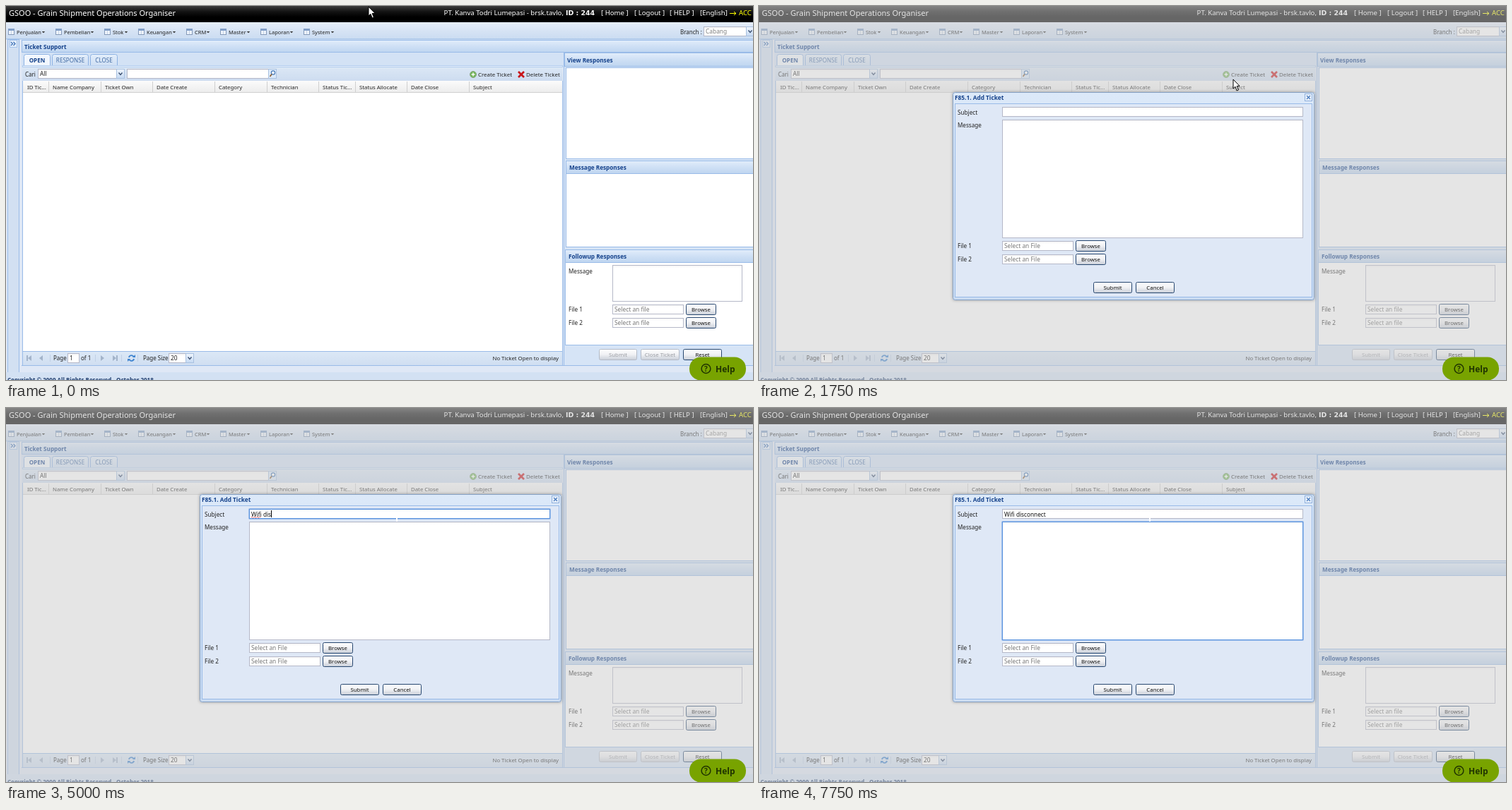
These frames come from a looping animation (1057x530 px, 8 s). An HTML page with a canvas:

```html
<!DOCTYPE html>
<html lang="en">
<head>
<meta charset="utf-8">
<title>Ticket support</title>
<style>
  html, body { margin: 0; width: 100%; height: 100%; overflow: hidden; background: #dfe8f6; }
  canvas { display: block; }
</style>
</head>
<body>
<canvas id="stage" width="1057" height="530"></canvas>
<script>
const ctx = document.getElementById('stage').getContext('2d');
const LOOP = 8000, STEP = 250;
const FONT = '"Noto Sans", "Open Sans", sans-serif';
const BORDER = '#99bbe8', PALE = '#dfe8f6', NAVY = '#15428b', INK = '#222', GREY = '#808080';

// ---- primitives ----
function box(x, y, w, h, fill, stroke) {
  if (fill) { ctx.fillStyle = fill; ctx.fillRect(x, y, w, h); }
  if (stroke) { ctx.strokeStyle = stroke; ctx.lineWidth = 1; ctx.strokeRect(x + .5, y + .5, w - 1, h - 1); }
}
function fade(y, h, ...colors) {
  const g = ctx.createLinearGradient(0, y, 0, y + h);
  colors.forEach((c, i) => g.addColorStop(i / (colors.length - 1), c));
  return g;
}
function text(str, x, y, color = INK, size = 8, weight = 400, align = 'left') {
  ctx.font = `${weight} ${size}px ${FONT}`;
  ctx.textAlign = align;
  ctx.fillStyle = color;
  ctx.fillText(str, x, y);
}
const bold = (str, x, y, color = NAVY, size = 8.2) => text(str, x, y, color, size, 700);
function line(points, color, width = 1, close = false) {
  ctx.beginPath();
  points.forEach(([x, y]) => ctx.lineTo(x, y));
  if (close) ctx.closePath();
  ctx.strokeStyle = color;
  ctx.lineWidth = width;
  ctx.stroke();
}
function shape(points, color) {
  ctx.beginPath();
  points.forEach(([x, y]) => ctx.lineTo(x, y));
  ctx.fillStyle = color;
  ctx.fill();
}
function round(x, y, w, h, r, fill, stroke) {
  ctx.beginPath();
  ctx.roundRect(x, y, w, h, r);
  if (fill) { ctx.fillStyle = fill; ctx.fill(); }
  if (stroke) { ctx.strokeStyle = stroke; ctx.lineWidth = 1; ctx.stroke(); }
}
function circle(x, y, r, fill, stroke, width = 1) {
  ctx.beginPath();
  ctx.arc(x, y, r, 0, 7);
  if (fill) { ctx.fillStyle = fill; ctx.fill(); }
  if (stroke) { ctx.strokeStyle = stroke; ctx.lineWidth = width; ctx.stroke(); }
}

// ---- widgets ----
const down = (x, y, color, r = 2.2) => shape([[x - r, y], [x + r, y], [x, y + r]], color);
function field(x, y, w, h, value = '', color = INK, stroke = '#b5b8c8') {
  box(x, y, w, h, fade(y, 4, '#f0f0f0', '#fff'), stroke);
  text(value, x + 3, y + 10, color, 8.4);
}
function trigger(x, y) {
  box(x, y, 12, 14, fade(y, 14, '#f2f7fd', '#c3d8f2'), '#a9c1e0');
  line([[x + 3.5, y + 5.5], [x + 6, y + 8.5], [x + 8.5, y + 5.5]], '#3a4f70', 1.4);
}
function button(label, x, y, w, disabled) {
  round(x + .5, y + .5, w - 1, 15, 2, fade(y, 16, '#fff', '#f0f1f4', '#c6ccd6'), disabled ? '#b3bac6' : '#26466f');
  text(label, x + w / 2, y + 10.5, disabled ? '#9a9da3' : '#111', 7.8, disabled ? 400 : 500, 'center');
}
function header(title, x, y, w, h, tx) {
  box(x, y, w, h, fade(y, h, '#e3eefb', '#cfe0f5', '#bed5f0'), BORDER);
  bold(title, tx, y + h / 2 + 3.5);
}
function windowIcon(x, y) {
  box(x, y, 9, 9, '#eef4fc', '#8499b8');
  box(x, y, 9, 3, '#829fc8');
  line([[x + 4.5, y + 3], [x + 4.5, y + 8]], '#c5d3e6');
}
function fileRow(label, lx, x, y, hint) {
  text(label, lx, y + 10, INK, 8.2);
  field(x, y, 101, 14, hint, '#777');
  button('Browse', x + 104, y - 1, 43);
}

// ---- page ----
function topBar() {
  box(0, 0, 1057, 23, fade(0, 23, '#3d3d3d', '#141414', '#000', '#000'));
  text('GSOO - Grain Shipment Operations Organiser', 4, 14, '#fff', 11);
  text('PT. Kanva Todri Lumepasi - brsk.tavlo,', 789, 13, '#fff', 9.6, 400, 'right');
  ctx.font = 'bold 9.4px "DejaVu Sans", sans-serif';
  ctx.textAlign = 'left';
  ctx.fillText('ID : 244', 792, 13);
  [['[ Home ]', 842], ['[ Logout ]', 889], ['[ HELP ]', 939], ['[English]', 982]]
    .forEach(([s, x]) => text(s, x, 13, '#fff', 9.6));
  line([[1024, 10.5], [1033, 10.5]], '#ff0');
  line([[1030, 8], [1033, 10.5], [1030, 13]], '#ff0');
  text('ACC', 1037, 13, '#ff0', 9.6);
}
function menuBar() {
  box(0, 23, 1057, 25, fade(23, 25, '#e6eefa', '#d6e3f4', '#c9dbf1'));
  box(0, 46, 1057, 1, '#a9c6ea');
  [['Penjualan', 15, 53], ['Pembelian', 82, 122], ['Stok', 151, 170], ['Keuangan', 199, 238],
   ['CRM', 267, 286], ['Master', 315, 343], ['Laporan', 372, 404], ['System', 433, 462]]
    .forEach(([label, x, arrow]) => {
      windowIcon(x - 12, 32);
      text(label, x, 39.5, INK, 7.5);
      down(arrow, 36, '#333');
    });
  text('Branch :', 954, 39.5);
  field(987, 29, 61, 14, 'Cabang', GREY);
  trigger(1047, 29);
}
function sidebar() {
  box(2, 47, 17, 483, '#d2e0f2', BORDER);
  box(5, 48, 11, 11, '#e4eefb', '#a5c3ea');
  [7, 10.5].forEach(x => line([[x, 51], [x + 2.5, 53.5], [x, 56]], '#3b6fb5', 1.2));
}
function ticketTabs() {
  box(22, 66, 767, 21, '#d3e2f5');
  [['OPEN', 25, 38], ['RESPONSE', 65, 52], ['CLOSE', 119, 39]].forEach(([label, x, w], i) => {
    round(x + .5, 68.5, w - 1, 17, [3, 3, 0, 0], i ? fade(68, 17, '#e3eefb', '#cfdff3') : '#f2f7fe', '#8db2e3');
    text(label, x + w / 2, 79.5, i ? '#416aa3' : NAVY, 8.1, i ? 400 : 700, 'center');
  });
  box(23, 84, 765, 3, '#e6effb', '#b3cdee');
}
function searchBar(hover) {
  box(23, 87, 765, 19, fade(87, 19, '#dbe7f5', '#cddcf0'));
  text('Cari', 27, 99.5);
  field(45, 89, 112, 14, 'All');
  trigger(156, 89);
  field(171, 89, 201, 14);
  box(371, 89, 12, 14, '#dceafa', '#a9c1e0');
  circle(378, 94.5, 2.6, '#fff', '#477ab8', 1.2);
  line([[376, 96.5], [373.5, 100]], '#8a5b2c', 1.6);
  if (hover) round(653.5, 89.5, 64, 14, 2, fade(89, 15, '#dcebfc', '#b5d2f3'), '#7fa5d6');
  circle(661, 97, 4.5, '#73b55b', '#8ba784');
  line([[658.5, 97], [663.5, 97]], '#fff', 1.4);
  line([[661, 94.5], [661, 99.5]], '#fff', 1.4);
  text('Create Ticket', 668, 100, INK, 7.9);
  line([[725, 93], [733, 101]], '#c8161b', 2.6);
  line([[733, 93], [725, 101]], '#c8161b', 2.6);
  text('Delete Ticket', 736, 100, INK, 7.9);
}
function grid() {
  box(23, 106, 765, 384, '#fff', BORDER);
  box(24, 106, 763, 17, fade(106, 17, '#fbfbfb', '#ececec'));
  box(24, 122, 763, 1, '#d0d0d0');
  [['ID Tic...', 30], ['Name Company', 66], ['Ticket Own', 140], ['Date Create', 213], ['Category', 301],
   ['Technician', 375], ['Status Tic...', 448], ['Status Allocate', 500], ['Date Close', 573], ['Subject', 661]]
    .forEach(([label, x], i) => {
      text(label, x, 118, INK, 7.8);
      if (i) box(x - 6, 107, 1, 15, '#cfcfcf');
    });
}
function pager() {
  box(23, 489, 765, 21, fade(489, 21, '#dce8f6', '#cfdef1'), BORDER);
  const faded = '#a3b4ca';
  [[34, -1, 1], [50, -1, 0], [136, 1, 0], [153, 1, 1]].forEach(([x, dir, bar]) => {
    shape([[x - 2 * dir, 495], [x + 3 * dir, 499], [x - 2 * dir, 503]], faded);
    if (bar) box(x + 4 * dir - 1, 495, 2, 8, faded);
  });
  [63, 127, 164, 187].forEach(x => box(x - 1, 494, 1, 10, '#c0d0e6'));
  text('Page', 67, 502);
  field(87, 492, 17, 14, '1');
  text('of 1', 106, 502);
  [0, Math.PI].forEach(a => {
    ctx.beginPath();
    ctx.arc(177.5, 499, 3.8, a + .3, a + 2.7);
    ctx.strokeStyle = '#3d83cf';
    ctx.lineWidth = 1.9;
    ctx.stroke();
  });
  shape([[179, 498], [183, 498], [183, 494]], '#3d83cf');
  shape([[176, 500], [172, 500], [172, 504]], '#3d83cf');
  text('Page Size', 194, 502);
  field(230, 492, 25, 14, '20');
  trigger(254, 492);
  text('No Ticket Open to display', 782, 502, INK, 7.8, 400, 'right');
}
function responses() {
  box(789, 66, 268, 443, '#d6e4f6');
  box(789, 66, 1, 443, BORDER);
  header('View Responses', 790, 66, 270, 20, 794);
  box(792, 87, 268, 130, '#fff', BORDER);
  header('Message Responses', 792, 219, 268, 19, 797);
  box(792, 237, 268, 105, '#fff', BORDER);
  header('Followup Responses', 791, 345, 269, 19, 796);
  box(791, 363, 269, 118, '#fff', BORDER);
  text('Message', 796, 379, INK, 8.1);
  field(858, 367, 184, 52);
  fileRow('File 1', 796, 858, 423, 'Select an file');
  fileRow('File 2', 796, 858, 442, 'Select an file');
  button('Submit', 839, 486, 54, true);
  button('Close Ticket', 898, 486, 55, true);
  button('Reset', 958, 486, 55);
}
function page(hover) {
  box(0, 0, 1057, 530, PALE);
  topBar();
  menuBar();
  sidebar();
  header('Ticket Support', 22, 48, 1040, 18, 26);
  ticketTabs();
  searchBar(hover);
  grid();
  pager();
  responses();
  box(22, 509, 1035, 1, BORDER);
  box(0, 519, 1057, 11, '#d3e1f3');
  bold('Copyright © 2009 All Rights Reserved - October 2018', 2, 533, '#1f3d6e', 8);
}
function helpButton() {
  round(967, 497.5, 80, 33, 16, '#78a300');
  circle(990.5, 514, 6.4, null, '#213500', 1.5);
  text('?', 990.5, 518, '#213500', 10, 700, 'center');
  bold('Help', 1004, 518.5, '#213500', 12);
}

// ---- dialog ----
function dialog({ value, focus, caret, spelling, beam }) {
  ctx.save();
  ctx.shadowColor = 'rgba(70,70,70,.45)';
  ctx.shadowBlur = 4;
  round(274, 122, 512, 295, 3, '#ced9e7');
  ctx.restore();
  round(274.5, 122.5, 511, 294, 3, fade(122, 295, '#dce9f9', '#cfdff3', '#cbdcf2'), '#84a0c4');
  bold('F85.1. Add Ticket', 277, 132.5, NAVY, 8.3);
  box(772, 124, 11, 11, '#e8f1fc', '#8fb0dc');
  line([[775, 127], [780, 132]], '#4a7bbd', 1.2);
  line([[780, 127], [775, 132]], '#4a7bbd', 1.2);
  box(277, 138, 506, 275, PALE, BORDER);

  text('Subject', 281, 153.5, INK, 8.2);
  text('Message', 281, 171.5, INK, 8.1);
  entry(344, 143, 426, 14, focus === 'subject');
  entry(344, 161, 426, 168, focus === 'message');
  text(value, 347, 153.5, '#111', 8.25);
  if (spelling) for (let x = 347; x < 361; x += 2) box(x, 154 + (x - 347) / 2 % 2, 1, 1, '#e33');
  if (caret) {
    const end = focus === 'subject' ? ctx.measureText(value).width : 0;
    box(Math.round(347 + end), focus === 'subject' ? 145 : 163, 1, 10, '#000');
  }
  if (beam) box(552, 156, 2, 5, '#fff');

  fileRow('File 1', 281, 344, 333, 'Select an File');
  fileRow('File 2', 281, 344, 352, 'Select an File');
  button('Submit', 473, 391, 55);
  button('Cancel', 533, 391, 55);
}
function entry(x, y, w, h, focused) {
  box(x, y, w, h, fade(y, 4, '#f1f1f1', '#fff'), focused ? '#5b93de' : '#b5b8c8');
  if (focused) round(x - .5, y - .5, w + 1, h + 1, 1, null, 'rgba(110,160,228,.55)');
}

// ---- pointers ----
const ARROW = [[0, 0], [0, 13], [3, 10.3], [5.2, 16], [7.4, 15], [5.2, 9.6], [9, 9.3]];
const HAND = [[-1, 0], [1, 0], [1.5, 6], [6, 7], [7, 9], [6, 14], [5, 17], [-1, 17], [-2, 14], [-5, 10], [-4, 8.5], [-1.5, 10.5]];
function pointer(points, x, y) {
  ctx.save();
  ctx.translate(x, y);
  ctx.lineJoin = 'round';
  shape(points, '#fff');
  line(points, '#000', 1, true);
  if (points === HAND) [2, 4].forEach(k => line([[k, 6.5], [k, 9.5]], '#000', .8));
  ctx.restore();
}
function textBeam(x, y) {
  line([[x - 2.5, y - 7], [x + 2.5, y - 7]], '#222');
  line([[x, y - 7], [x, y + 7]], '#222');
  line([[x - 2.5, y + 7], [x + 2.5, y + 7]], '#222');
}

// ---- timeline ----
const SUBJECT = 'Wifi disconnect';
function typedLength(t) {
  if (t < 3500) return 0;
  if (t < 4750) return 1 + (t - 3500) / STEP;
  if (t < 6000) return 7 + (t - 4750) / STEP;
  if (t < 6500) return 13;
  return t < 6750 ? 14 : 15;
}
function render(time) {
  const t = Math.floor(time / STEP) * STEP;
  const open = t >= 1750;
  const step = Math.min(1, Math.max(0, (t - STEP) / 1250));
  const ease = step * step * (3 - 2 * step);
  const over = !open && ease > .88;

  page(over);
  if (open) {
    box(0, 0, 1057, 530, 'rgba(204,204,204,.5)');
    const early = t === 2500 || t === 2750;
    dialog({
      value: early ? 'w' : SUBJECT.slice(0, typedLength(t)),
      focus: t >= 7250 ? 'message' : t >= 2250 ? 'subject' : '',
      caret: t >= 2250 && t !== 3000 && t !== 3250 && t !== 7000 && t < 7750,
      spelling: t >= 4500 && t < 7250,
      beam: t >= 2500
    });
  }
  helpButton();

  if (!open) pointer(over ? HAND : ARROW, 513 + 164 * ease, 1 + 102 * ease);
  else if (t < 2250) pointer(ARROW, t < 2000 ? 671 : 606, t < 2000 ? 104 : 130);
  else if (t < 2500) textBeam(552.5, 152);
}
function tick() {
  render(performance.now() % LOOP);
  requestAnimationFrame(tick);
}
tick();
</script>
</body>
</html>
```
